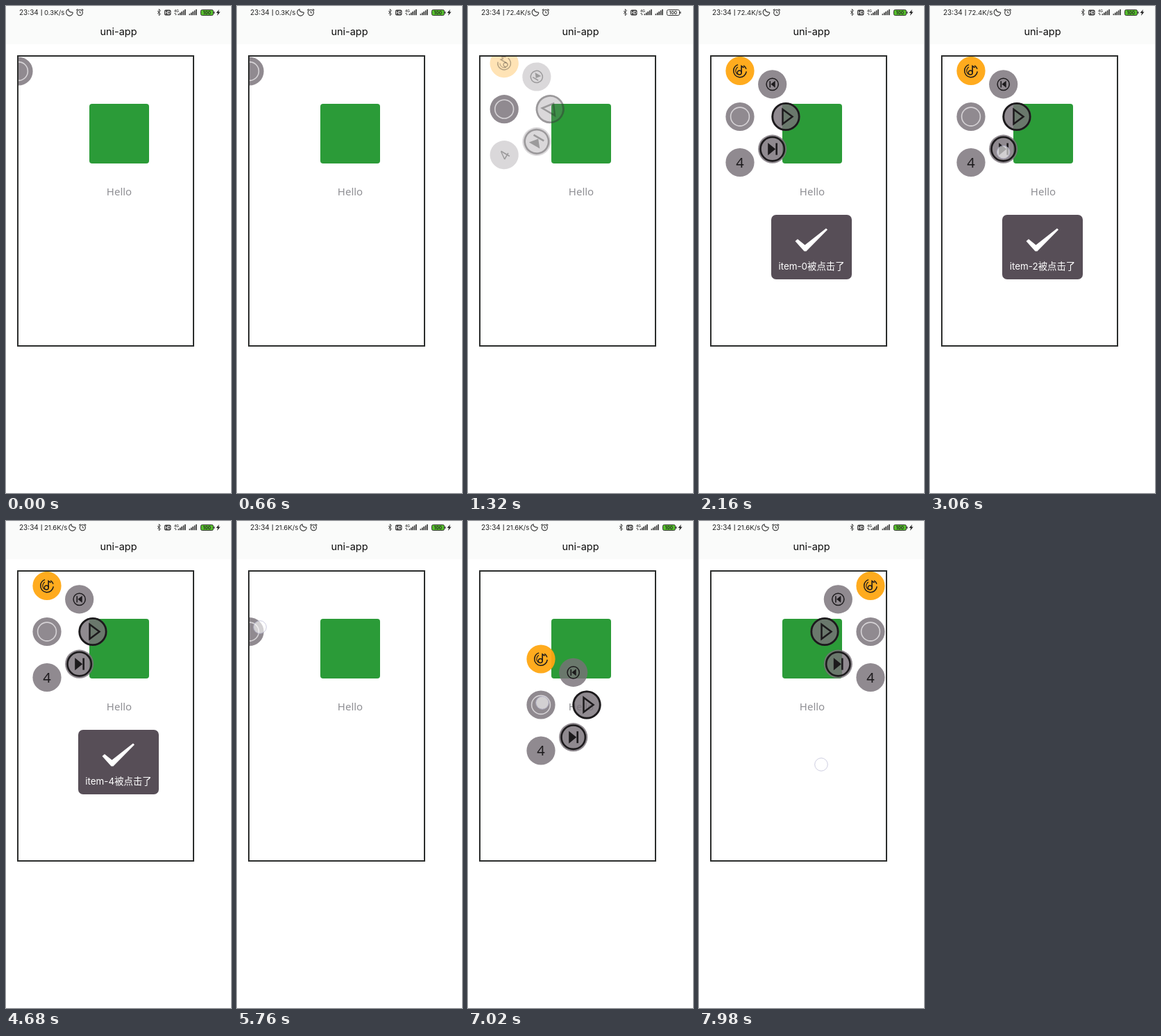
Write an HTML page with a canvas that moves like this. It is 324 px wide and 702 px high and loops after 8 s.

```html
<!DOCTYPE html>
<html lang="en">
<head>
<meta charset="utf-8">
<title>Floating menu</title>
<style>
html, body { margin: 0; width: 100%; height: 100%; overflow: hidden; background: #fff; }
canvas { display: block; width: 324px; height: 702px; }
</style>
</head>
<body>
<canvas id="stage"></canvas>
<script>
const W = 324, H = 702, LOOP = 8000, TAU = Math.PI * 2;
const INK = '#1c1a1c', GREY = 'rgba(120,113,120,.82)', ORANGE = 'rgba(255,166,16,.94)';
const UI = 'Inter, "Noto Sans CJK SC", "Noto Sans CJK", sans-serif';
const canvas = document.getElementById('stage');
const ctx = canvas.getContext('2d');
const dpr = window.devicePixelRatio || 1;
canvas.width = W * dpr;
canvas.height = H * dpr;

const clamp = v => Math.max(0, Math.min(1, v));
const span = (t, a, b) => clamp((t - a) / (b - a));
const mix = (a, b, p) => a + (b - a) * p;
const easeOut = p => 1 - (1 - p) ** 3;
const smooth = p => p * p * (3 - 2 * p);

function disc(x, y, r, color) {
  ctx.fillStyle = color;
  ctx.beginPath();
  ctx.arc(x, y, r, 0, TAU);
  ctx.fill();
}
function ring(x, y, r, width, color, from = 0, to = TAU) {
  ctx.strokeStyle = color;
  ctx.lineWidth = width;
  ctx.beginPath();
  ctx.arc(x, y, r, from, to);
  ctx.stroke();
}
function path(points, closed) {
  ctx.beginPath();
  points.forEach(([x, y]) => ctx.lineTo(x, y));
  if (closed) ctx.closePath();
}
function line(points, width, color, closed) {
  path(points, closed);
  ctx.strokeStyle = color;
  ctx.lineWidth = width;
  ctx.stroke();
}
function shape(points, color) {
  path(points, true);
  ctx.fillStyle = color;
  ctx.fill();
}
function panel(x, y, w, h, r, color) {
  ctx.fillStyle = color;
  ctx.beginPath();
  ctx.roundRect(x, y, w, h, r);
  ctx.fill();
}
function text(str, x, y, font, color, align = 'left') {
  ctx.font = font;
  ctx.fillStyle = color;
  ctx.textAlign = align;
  ctx.fillText(str, x, y);
}

// Status bar
function signal(x) {
  for (let i = 0; i < 5; i++) {
    const h = 2 + i * 1.6;
    ctx.fillStyle = '#333';
    ctx.fillRect(x + i * 2.4, 13.2 - h, 1.6, h);
  }
}
function battery(x, charging) {
  ctx.lineWidth = 1;
  ctx.strokeStyle = '#333';
  ctx.beginPath();
  ctx.roundRect(x + .5, 5.5, 18, 8, 2);
  if (charging) {
    ctx.fillStyle = '#55bd2c';
    ctx.fill();
  }
  ctx.stroke();
  ctx.fillStyle = '#333';
  ctx.fillRect(x + 19.3, 8, 1.2, 3);
  text('100', x + 9.5, 12, `600 6.5px ${UI}`, '#222', 'center');
  if (charging) shape([[x + 27, 5], [x + 22.5, 10], [x + 25, 10], [x + 24, 14], [x + 28.5, 8.6], [x + 26, 8.6]], '#222');
}
function moon(x) {
  ctx.strokeStyle = '#333';
  ctx.lineWidth = 1.1;
  ctx.beginPath();
  ctx.arc(x, 9.3, 4.8, -.0, 4.4);
  ctx.quadraticCurveTo(x - 2, 9, x + 4.8, 9.3);
  ctx.stroke();
}
function alarm(x) {
  ring(x, 9.6, 4.1, 1.1, '#333');
  line([[x, 7.2], [x, 9.9], [x + 1.9, 9.9]], 1, '#333');
  line([[x - 5, 6.3], [x - 2.8, 4.5]], 1.1, '#333');
  line([[x + 5, 6.3], [x + 2.8, 4.5]], 1.1, '#333');
}
function header(t) {
  ctx.fillStyle = '#fafbfa';
  ctx.fillRect(0, 0, W, 55);
  const [speed, icon] = t < 720 ? ['0.3K/s', 91.5] : t < 4560 ? ['72.4K/s', 97] : ['21.6K/s', 95.5];
  const charging = t < 900 || t >= 1800;
  text('23:34', 19, 13, `10px ${UI}`, '#222');
  ctx.fillStyle = '#333';
  ctx.fillRect(50.7, 5, 1, 9);
  text(speed, 55, 13, `9.6px ${UI}`, '#222');
  moon(icon);
  alarm(icon + 14.8);

  ctx.save();
  ctx.translate(charging ? 0 : 6, 0);
  line([[218, 7], [222.7, 11.5], [220.4, 13.8], [220.4, 4.5], [222.7, 6.8], [218, 11.3]], .9, '#333');
  panel(228, 5.5, 9.5, 8, 2, '#333');
  text('HD', 232.75, 11.6, `700 5.5px ${UI}`, '#fff', 'center');
  text('4G', 242, 8.5, `600 5px ${UI}`, '#333');
  shape([[242, 11], [243.5, 9.7], [245, 11]], '#333');
  shape([[243, 11.7], [246, 11.7], [244.5, 13.3]], '#333');
  signal(247.6);
  signal(263.6);
  battery(280, charging);
  ctx.restore();
  text('uni-app', 162, 42, `14.5px ${UI}`, '#0c0c0c', 'center');
}

// Menu icons, each centred on 0,0
const icons = [
  () => {
    ring(0, 0, 9.3, 1.5, INK, .1, 4.4);
    ring(0, 0, 9.3, 1.5, INK, 5.3, 6);
    ring(0, 0, 6.2, 1.1, INK, 2.2, 4.2);
    ring(-.8, 2.6, 3, 1.5, INK);
    line([[2.1, 2.6], [2.1, -7], [5.6, -4.6]], 1.6, INK);
  },
  () => {
    ring(0, 0, 8.6, 1.5, INK);
    shape([[4, -5], [4, 5], [-2.2, 0]], INK);
    line([[-3.4, -4.6], [-3.4, 4.6]], 1.6, INK);
  },
  () => {
    ring(0, 0, 19.2, 2.8, INK);
    line([[-4.5, -10.5], [9.5, 0], [-4.5, 10.5]], 2.5, INK, true);
  },
  () => {
    ring(0, 0, 17.2, 2.6, INK);
    shape([[-6.5, -9], [4.5, 0], [-6.5, 9]], INK);
    line([[6, -8.5], [6, 8.5]], 2.6, INK);
  },
  () => text('4', 0, 7.5, '20px "Noto Sans", sans-serif', INK, 'center')
];

function items(x, y, p, side) {
  icons.forEach((icon, i) => {
    const a = (i - 2) * Math.PI / 4;
    ctx.save();
    ctx.globalAlpha = p ** 1.4;
    ctx.translate(x + side * 66 * Math.cos(a), y + 66 * Math.sin(a));
    ctx.rotate(-TAU * (1 - easeOut(p)));
    disc(0, 0, 20.6, i ? GREY : ORANGE);
    icon();
    ctx.restore();
  });
}

// Drag route of the open menu: time, x, y
const route = [[6560, 59, 159.5], [7020, 105, 265], [7240, 170, 225], [7440, 228, 159.5], [7700, 247, 159.5]];
function dragged(t) {
  if (t <= route[0][0]) return route[0].slice(1);
  for (let i = 1; i < route.length; i++) {
    const [ta, xa, ya] = route[i - 1], [tb, xb, yb] = route[i];
    if (t < tb) {
      const p = (i === route.length - 1 ? easeOut : smooth)((t - ta) / (tb - ta));
      return [mix(xa, xb, p), mix(ya, yb, p)];
    }
  }
  return route[route.length - 1].slice(1);
}

function menu(t) {
  let p, x, y;
  if (t < 3000) {
    p = span(t, 1100, 1590);
    x = mix(18, 59, easeOut(p));
    y = mix(94, 159.5, easeOut(p));
  } else if (t < 6560) {
    p = t < 5700 ? 1 - span(t, 5180, 5640) : span(t, 5880, 6370);
    x = mix(18, 59, easeOut(p));
    y = 159.5;
  } else {
    p = 1;
    [x, y] = dragged(t);
  }
  ctx.save();
  ctx.beginPath();
  ctx.rect(18, 73, 251, 416);
  ctx.clip();
  if (p > 0) items(x, y, p, t < 7440 ? 1 : -1);
  disc(x, y, 20.6, GREY);
  ring(x, y, 13.4, 1.6, '#d6d3d6');
  ctx.restore();
}

// Taps on the items, in order
const taps = [1860, 2280, 2700, 3120, 3540];
function toast(t) {
  const index = taps.filter(at => t >= at).length - 1;
  if (index < 0 || t >= 4980) return;
  panel(104, 301, 116, 93, 7, 'rgba(62,52,62,.87)');
  shape([[138.5, 339], [142, 336], [152.5, 344.5], [183, 320.5], [185, 322.5], [154.5, 353.5], [151.5, 353.5]], '#fff');
  text(`item-${index}被点击了`, 162, 379.5, `13.4px ${UI}`, '#fff', 'center');
}

// Finger presses: start, end, x, y
const presses = [
  [960, 1100, 30, 95],
  ...taps.map((at, i) => {
    const a = (i - 2) * Math.PI / 4;
    return [at - 100, at, 59 + 66 * Math.cos(a), 160 + 66 * Math.sin(a) + 4];
  }),
  [5060, 5180, 60, 159],
  [5720, 5860, 33, 153]
];
function finger(x, y, fill = .6) {
  disc(x, y, 9, `rgba(255,255,255,${fill})`);
  ring(x, y, 9.3, .9, 'rgba(186,186,212,.8)');
}
function touches(t) {
  for (const [from, to, x, y] of presses) if (t >= from && t < to) finger(x, y);
  if (t >= 6480 && t < 7440) {
    const [x, y] = dragged(t);
    finger(x + 2, y - 3);
  }
  if (t >= 7800) finger(176, 351, .2);
}

function draw(t) {
  ctx.setTransform(dpr, 0, 0, dpr, 0, 0);
  ctx.fillStyle = '#fff';
  ctx.fillRect(0, 0, W, H);
  header(t);
  ctx.strokeStyle = '#2b2d2c';
  ctx.lineWidth = 2;
  ctx.strokeRect(17, 72, 253, 418);
  panel(120, 141, 86, 86, 4, '#2b9b38');
  text('Hello', 163, 273, '15px "Noto Sans", sans-serif', '#8f8f94', 'center');
  menu(t);
  toast(t);
  touches(t);
}

const start = performance.now();
function tick() {
  draw((performance.now() - start) % LOOP);
  requestAnimationFrame(tick);
}
tick();
</script>
</body>
</html>
```
